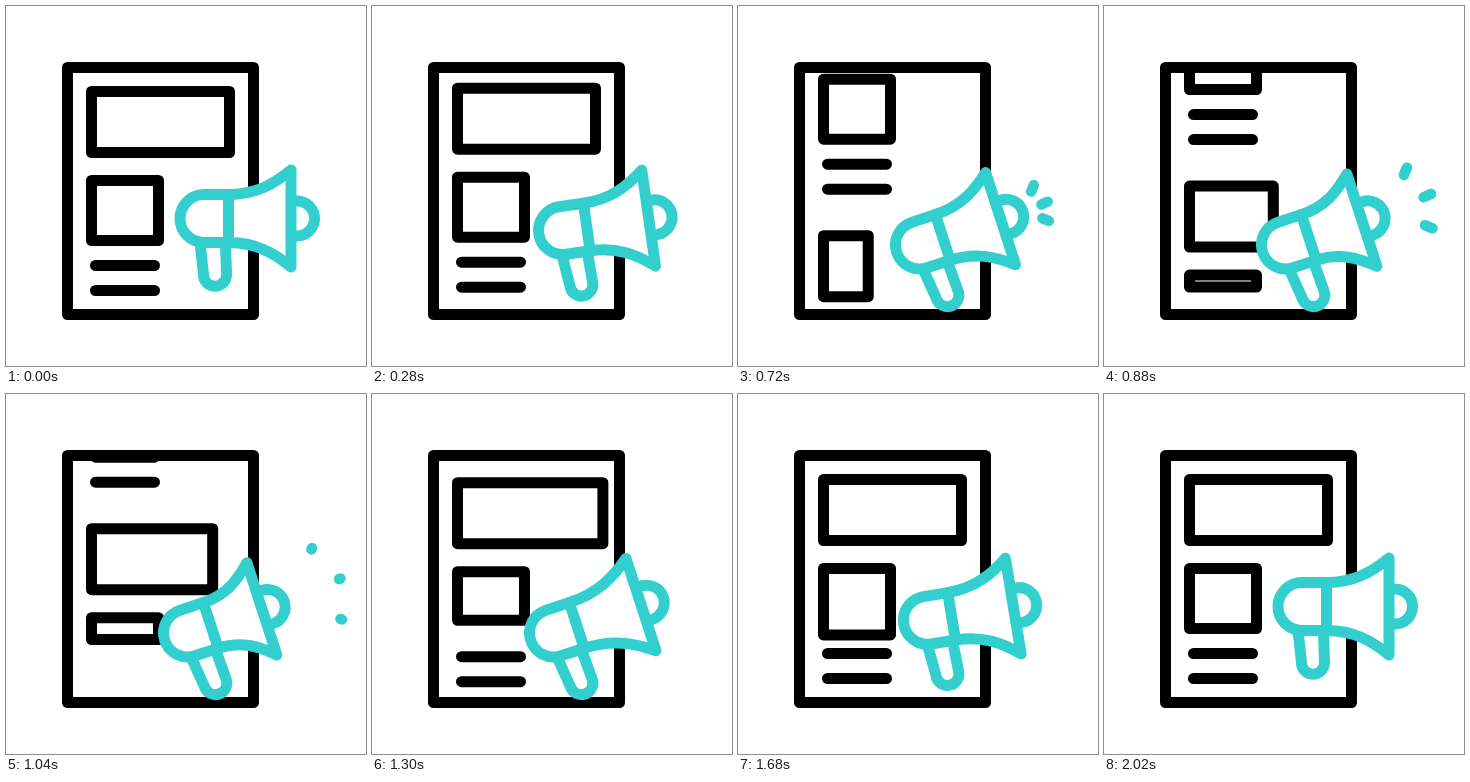
An HTML page for the animation above (2.42 s loop, 360 px wide and 360 px high).

```html
<!DOCTYPE html>
<html lang="en">
<head>
<meta charset="utf-8">
<title>News announcement</title>
<style>
  html, body { margin: 0; width: 100%; height: 100%; overflow: hidden; background: #fff; }
  svg { display: block; width: 100vw; height: 100vh; }
  .ink, .teal { stroke-width: 11; stroke-linecap: round; stroke-linejoin: round; }
  .ink { stroke: #000; fill: none; }
  .teal { stroke: #33cfcf; fill: #fff; }
</style>
</head>
<body>
<svg viewBox="0 0 360 360">
  <clipPath id="sheet"><rect x="61.5" y="61.5" width="186" height="247"/></clipPath>
  <g class="ink">
    <g clip-path="url(#sheet)">
      <g id="column">
        <rect x="85.5" y="85.5" width="138" height="61"/>
        <rect x="85.5" y="174.5" width="67" height="60"/>
        <path d="M89.5 259.5H148.5M89.5 284.5H148.5"/>
        <g transform="translate(0 245.5)">
          <rect id="banner" x="85.5" y="85.5" height="61"/>
          <rect id="photo" x="85.5" y="174.5" width="67"/>
          <path d="M89.5 259.5H148.5M89.5 284.5H148.5"/>
        </g>
      </g>
    </g>
    <rect x="61.5" y="61.5" width="186" height="247"/>
  </g>
  <g class="teal">
    <path id="sparks" stroke-width="10.5"/>
    <g id="horn">
      <path d="M-4 24L-.5 56A11.5 11.5 0 0 0 22.5 56.5L21.5 24"/>
      <path id="cap" d="M87 -17.5h6a17.5 17.5 0 0 1 0 35h-6"/>
      <path id="bell"/>
      <path d="M24.5 -24V24"/>
    </g>
  </g>
</svg>
<script>
  const LOOP = 2420;
  const $ = id => document.getElementById(id);

  // Steps of [time, value], eased in and out between neighbours.
  const tracks = {
    scroll:  [[200, 0], [1380, -245.5]],
    bannerW: [[460, 11], [1260, 146], [1500, 138]],
    photoH:  [[820, 11], [1610, 68], [1860, 60]],
    tilt:    [[0, 0], [600, 1], [1360, 1], [2020, 0]],
    stretch: [[600, 0], [1020, -9], [1300, 5], [1540, 0]],
    head:    [[540, 0], [1020, 1]],
    tail:    [[600, 0], [1100, 1]]
  };
  const rays = [[291, 191, 306, 154], [298, 201, 334.5, 184.5], [299, 210, 336, 225.5]];

  const mix = (a, b, u) => a + (b - a) * u;

  function at(steps, t) {
    if (t <= steps[0][0]) return steps[0][1];
    for (let i = 1; i < steps.length; i++) {
      const [t0, a] = steps[i - 1], [t1, b] = steps[i];
      if (t < t1) {
        const u = (t - t0) / (t1 - t0);
        return mix(a, b, u * u * (3 - 2 * u));
      }
    }
    return steps[steps.length - 1][1];
  }

  function bellPath(s) {
    const x = 87 + s, c1 = 52 + s * .4, c2 = 70 + s * .75;
    return `M24.5 -24H0A24 24 0 0 0 0 24H24.5C${c1} 24 ${c2} 34.5 ${x} 48.5` +
      `V-48.5C${c2} -34.5 ${c1} -24 24.5 -24Z`;
  }

  function draw(t) {
    const v = {};
    for (const name in tracks) v[name] = at(tracks[name], t);

    $('column').setAttribute('transform', `translate(0 ${v.scroll})`);
    $('banner').setAttribute('width', v.bannerW);
    $('photo').setAttribute('height', v.photoH);

    $('horn').setAttribute('transform',
      `translate(${198 - 16.5 * v.tilt} ${212.5 + 26.5 * v.tilt}) rotate(${-18 * v.tilt})`);
    $('bell').setAttribute('d', bellPath(v.stretch));
    $('cap').setAttribute('transform', `translate(${v.stretch} 0)`);

    const flying = t > 560 && t < 1100;
    $('sparks').setAttribute('d', flying ? rays.map(([x0, y0, x1, y1]) =>
      `M${mix(x0, x1, v.tail)} ${mix(y0, y1, v.tail)}L${mix(x0, x1, v.head)} ${mix(y0, y1, v.head)}`
    ).join('') : '');
  }

  const start = performance.now();
  function tick() {
    draw((performance.now() - start) % LOOP);
    requestAnimationFrame(tick);
  }
  tick();
</script>
</body>
</html>
```
